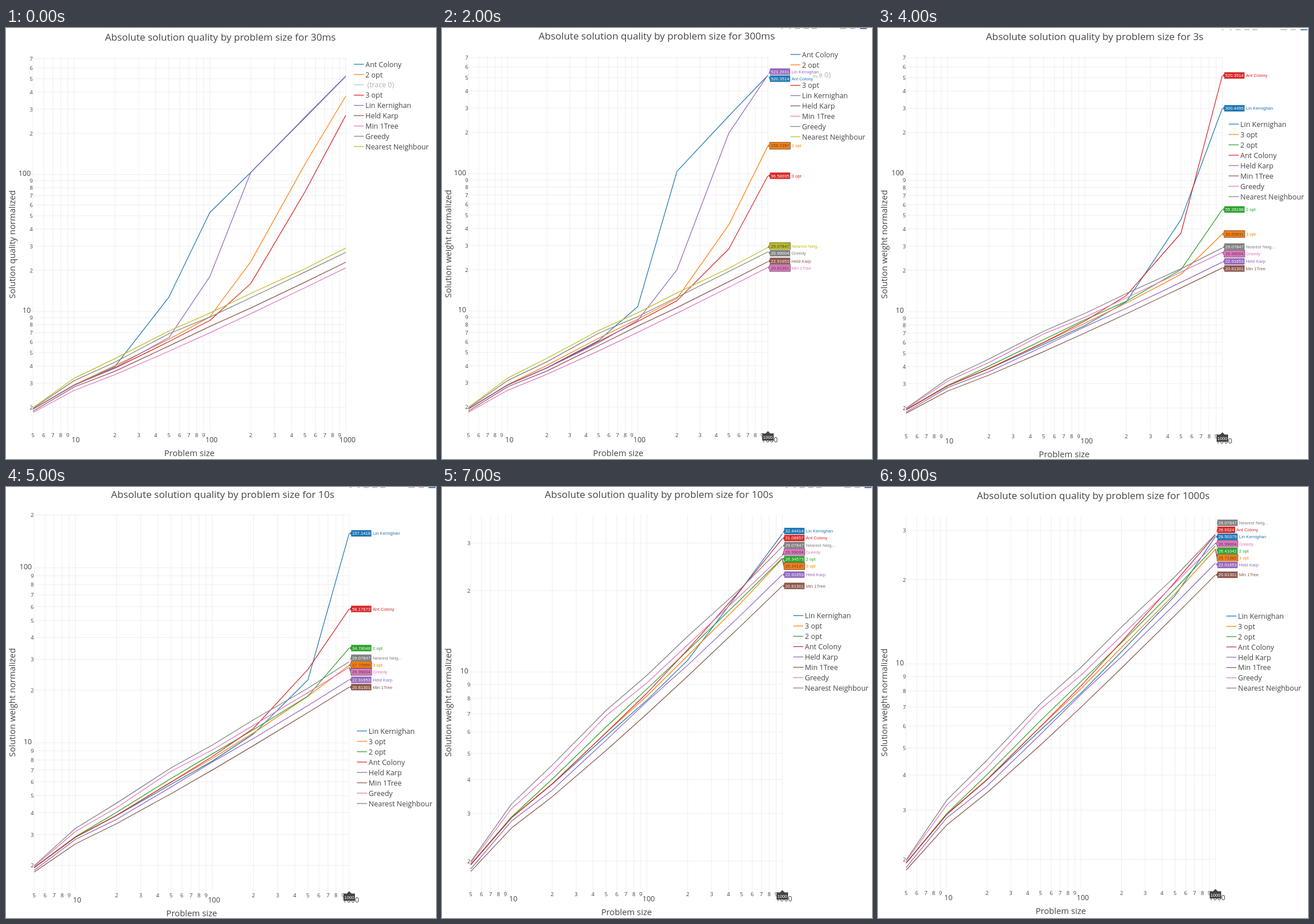
An HTML page for the animation above (10 s loop, 748x749 px).

```html
<!DOCTYPE html>
<html lang="en">
<head>
<meta charset="utf-8">
<title>Solution quality by problem size</title>
<style>
  html, body { margin: 0; width: 100%; height: 100%; overflow: hidden; background: #fff; }
  svg { display: block; width: 100%; height: 100%; }
  text { font-family: "Open Sans", sans-serif; fill: #444; white-space: pre; }
  .tip { font-family: "Liberation Sans", Arial, sans-serif; font-size: 7.65px; }
  .grid { stroke: #eee; stroke-width: 1; fill: none; }
  .curve { stroke-width: 1.25; fill: none; stroke-linejoin: round; }
</style>
</head>
<body>
<svg id="stage" viewBox="0 0 748 749"></svg>
<script>
const NS = "http://www.w3.org/2000/svg";
const SCENE_MS = 1000;
const SIZES = [5, 10, 20, 50, 100, 200, 500, 1000];
const COLORS = ["#1f77b4", "#ff7f0e", "#2ca02c", "#d62728", "#9467bd",
                "#8c564b", "#e377c2", "#7f7f7f", "#bcbd22"];
const DARK_TEXT = ["#ff7f0e", "#e377c2", "#bcbd22"];

const ANT = "Ant Colony", LK = "Lin Kernighan", OPT2 = "2 opt", OPT3 = "3 opt", HIDDEN = " (trace 0)";
const BOUNDS = ["Held Karp", "Min 1Tree", "Greedy", "Nearest Neighbour"];
const ORDER_A = [ANT, OPT2, HIDDEN, OPT3, LK, ...BOUNDS];
const ORDER_B = [LK, OPT3, OPT2, ANT, ...BOUNDS];

// Converged curves; each run replaces only the last few values.
const BASE = {
  [ANT]:  [1.94, 2.89, 3.86, 5.97, 8.35, 12, 19.6, 28.9324],
  [LK]:   [1.94, 2.89, 3.85, 5.8, 7.87, 11.05, 17.5, 28.50379],
  [OPT2]: [1.94, 2.91, 4.02, 6.27, 8.65, 11.9, 18.5, 26.41042],
  [OPT3]: [1.94, 2.9, 3.86, 5.97, 8.15, 11.45, 17.8, 25.71382],
  "Held Karp": [1.87, 2.81, 3.66, 5.6, 7.78, 10.6, 16.35, 22.91653],
  "Min 1Tree": [1.83, 2.65, 3.46, 5.13, 7, 9.65, 14.9, 20.81301],
  "Greedy": [1.97, 3.12, 4.27, 6.89, 9.11, 12.6, 19.4, 26.99004],
  "Nearest Neighbour": [1.99, 3.25, 4.53, 7.21, 9.72, 13.55, 20.5, 29.07847]
};

function run(ant, lk, opt2, opt3) {
  const tails = { [ANT]: ant, [LK]: lk, [OPT2]: opt2, [OPT3]: opt3 };
  const out = {};
  for (const name in BASE) {
    const tail = tails[name] || [];
    out[name] = BASE[name].slice(0, 8 - tail.length).concat(tail);
  }
  return out;
}

function between(a, b) {
  const out = {};
  for (const name in a) out[name] = a[name].map((v, i) => Math.sqrt(v * b[name][i]));
  return out;
}

const ms30 = run([3.96, 12.75, 52.9, 103.5, 259, 520.3514], [3.9, 6.45, 18, 103.5, 262, 523.2631],
                 [6.27, 9.14, 23.1, 118.5, 374], [6.03, 8.6, 16, 74.5, 270]);
const ms300 = run([6.1, 10.8, 104, 263, 520.3514], [5.88, 8.56, 20, 197, 523.2631],
                  [6.35, 8.73, 12.35, 42.4, 159.7297], [6, 8.4, 11.9, 28.3, 96.58695]);
const s3 = run([8.57, 13.1, 37.2, 520.3514], [7.94, 11.8, 46.7, 300.4495],
               [8.74, 11.9, 20.2, 55.28198], [8.25, 11.55, 18.7, 36.65631]);
const s10 = run([12.1, 26.3, 58.17873], [11.25, 22.9, 157.1418], [11.9, 18.5, 34.78048], [11.4, 18.5, 27.70958]);
const s30 = run([12, 21.1, 46.63331], [11.1, 21.1, 64.96653], [11.9, 18.5, 27.48489], [11.5, 18.3, 26.37077]);
const s100 = run([12.1, 20.3, 31.08857], [11.05, 20.3, 32.44414], [12, 18.7, 26.34573], [11.5, 18.1, 26.24137]);
const s1000 = run([], [], [], []);

// x: plot left/right, y: plot top/bottom, ten: y of value 10, dec: height of a decade,
// head: title centre, key: legend corner, bar: toolbar corner, k: text scale
const SCENES = [
  { label: "30ms", data: ms30, order: ORDER_A, x: [47, 591], y: [51, 701], ten: 492.7, dec: 238.1,
    head: [373, 16], key: [605, 63], ticks: 707, k: 1, plain: true },
  { label: "100ms", data: between(ms30, ms300), order: ORDER_A, x: [50, 600], y: [50, 702], ten: 493, dec: 239,
    head: [378, 15], key: [613, 58], ticks: 708, k: 1.008 },
  { label: "300ms", data: ms300, order: ORDER_A, x: [46, 567], y: [49, 701], ten: 491.9, dec: 238.7,
    head: [373.5, 14], key: [606, 46], ticks: 707, k: 1, bar: [590, 0] },
  { label: "1s", data: between(ms300, s3), order: ORDER_B, x: [48, 598], y: [50, 702], ten: 493, dec: 239,
    head: [376, 15], key: [610, 167], ticks: 708, k: 1.008 },
  { label: "3s", data: s3, order: ORDER_B, x: [49, 599], y: [50, 702], ten: 493, dec: 239.2,
    head: [377, 14.5], key: [610, 167], ticks: 709, k: 1.007, bar: [598, 2] },
  { label: "10s", data: s10, order: ORDER_B, x: [49, 597], y: [47, 702], ten: 444.7, dec: 304.4,
    head: [377, 13], key: [610.5, 424], ticks: 709, k: 1.007, bar: [598, 0] },
  { label: "30s", data: s30, order: ORDER_B, x: [50, 600], y: [46, 701], ten: 387.7, dec: 381,
    head: [379, 11], key: [613.5, 283.3], ticks: 708, k: 1.01 },
  { label: "100s", data: s100, order: ORDER_B, x: [50, 592], y: [48, 701], ten: 321.5, dec: 470,
    head: [377.5, 13], key: [611, 223.5], ticks: 707, k: 1.005, bar: [598, 0] },
  { label: "300s", data: between(s100, s1000), order: ORDER_B, x: [50, 600], y: [49, 701], ten: 314, dec: 480,
    head: [379, 13], key: [613.5, 224], ticks: 708, k: 1.01 },
  { label: "1000s", data: s1000, order: ORDER_B, x: [49, 587], y: [51, 698], ten: 307.3, dec: 486,
    head: [374.5, 15], key: [606, 224.3], ticks: 705, k: 1 }
];

function add(parent, tag, attrs, text) {
  const el = document.createElementNS(NS, tag);
  for (const a in attrs) el.setAttribute(a, attrs[a]);
  if (text !== undefined) el.textContent = text;
  parent.appendChild(el);
  return el;
}

// Text whose capitals are centred on y.
function write(g, text, x, y, size, anchor = "middle", extra = {}) {
  return add(g, "text", { x, y: y + size * 0.357, "font-size": size, "text-anchor": anchor, ...extra }, text);
}

// Moves sorted positions apart to a minimum gap, keeping each cluster centred.
function spread(ys, gap) {
  const blocks = [];
  ys.forEach((y, i) => {
    let b = { sum: y - i * gap, n: 1 };
    while (blocks.length) {
      const p = blocks[blocks.length - 1];
      if (p.sum / p.n <= b.sum / b.n) break;
      blocks.pop();
      b = { sum: p.sum + b.sum, n: p.n + b.n };
    }
    blocks.push(b);
  });
  return blocks.flatMap(b => Array(b.n).fill(b.sum / b.n)).map((y, i) => y + i * gap);
}

function drawAxes(g, s, px, py) {
  const [x0, x1] = s.x, [top, bottom] = s.y;
  const small = 9.4 * s.k, big = 12.4 * s.k;
  let lines = "";
  for (let e = 0; e <= 3; e++) {
    for (let m = 1; m <= 9; m++) {
      const v = m * 10 ** e, x = px(v), y = py(v);
      if (v >= 5 && v <= 1000) {
        lines += `M${x} ${top}V${bottom}`;
        if (m === 1) write(g, v, x + 3, s.ticks + 8.7, big);
        else write(g, m, x, s.ticks + 0.3, small);
      }
      if (y >= top && y <= bottom) {
        lines += `M${x0} ${y}H${x1}`;
        if (m === 1) write(g, v, x0 - 4, y - 2, big, "end");
        else write(g, m, x0 - 0.5, y + 0.3, small, "end");
      }
    }
  }
  g.insertBefore(add(g, "path", { class: "grid", d: lines }), g.firstChild);

  write(g, "Absolute solution quality by problem size for " + s.label, s.head[0], s.head[1], 17.05 * s.k);
  write(g, "Problem size", (x0 + x1) / 2, s.ticks + 31.5, 14.7 * s.k);
  const cy = (top + bottom) / 2;
  write(g, `Solution ${s.plain ? "quality" : "weight"} normalized`, 10.5, cy, 14.75 * s.k, "middle",
        { transform: `rotate(-90 10.5 ${cy})` });
}

function drawLegend(g, s) {
  const [x, y] = s.key;
  s.order.forEach((name, i) => {
    const cy = y + i * 17.88 * s.k;
    const row = add(g, "g", { opacity: name === HIDDEN ? 0.42 : 1 });
    add(row, "path", { class: "curve", d: `M${x} ${cy}h17.5`, stroke: COLORS[i] });
    write(row, name, x + 20.3, cy + 0.3, 12.4 * s.k, "start");
  });
}

function drawTips(g, s, py) {
  const x = s.x[1], left = x + 3;
  const tips = s.order.map((name, i) => ({ name, color: COLORS[i] }))
    .filter(t => s.data[t.name])
    .map(t => ({ ...t, value: s.data[t.name][7] }))
    .sort((a, b) => b.value - a.value);
  const rows = spread(tips.map(t => py(t.value)), 12.2);
  tips.forEach((t, i) => {
    const cy = rows[i], label = String(+t.value.toPrecision(7));
    const w = 36 - 4.4 * (8 - label.length);
    const ink = DARK_TEXT.includes(t.color) ? "#444" : "#fff";
    const name = t.name.length > 15 ? t.name.slice(0, 12) + "..." : t.name;
    add(g, "rect", { x: left + w, y: cy - 6, width: name.length * 3.7 + 2, height: 12, fill: "#fff" });
    add(g, "path", {
      d: `M${x} ${py(t.value)}L${left} ${cy - 3}V${cy - 6}h${w}v12H${left}V${cy + 3}Z`,
      fill: t.color, stroke: ink, "stroke-width": 0.8
    });
    write(g, label, left + w / 2, cy, 7.65, "middle", { class: "tip", style: `fill:${ink}` });
    write(g, name, left + w + 2, cy, 7.65, "start", { class: "tip", style: `fill:${t.color}` });
  });
  const y = s.ticks - 2.5;
  add(g, "path", { d: `M${x} ${y - 4}l4 4h6v12.5h-20v-12.5h6Z`, fill: "#444" });
  write(g, "1000", x, y + 6.3, 7.65, "middle", { class: "tip", style: "fill:#fff" });
}

function drawBar(g, [x, y]) {
  for (const [dx, w] of [[0, 3], [14, 3], [24, 9], [39, 9], [53, 9], [102, 11], [120, 9]])
    add(g, "rect", { x: x + dx, y, width: w, height: 1.6, fill: "#b9bbc2" });
  add(g, "rect", { x: x + 137, y, width: 12, height: 2, fill: "#5b78b8" });
}

function build(s) {
  const g = add(stage, "g", { display: "none" });
  const [x0, x1] = s.x;
  const px = v => x0 + (x1 - x0) * Math.log10(v / 5) / Math.log10(200);
  const py = v => s.ten - s.dec * Math.log10(v / 10);
  drawAxes(g, s, px, py);
  s.order.forEach((name, i) => {
    if (!s.data[name]) return;
    const points = s.data[name].map((v, j) => px(SIZES[j]) + "," + py(v)).join(" ");
    add(g, "polyline", { class: "curve", points, stroke: COLORS[i] });
  });
  drawLegend(g, s);
  if (!s.plain) drawTips(g, s, py);
  if (s.bar) drawBar(g, s.bar);
  return g;
}

const stage = document.getElementById("stage");
const groups = SCENES.map(build);
const start = performance.now();
let current = -1;

function update(now) {
  const i = Math.floor(Math.max(0, now - start) / SCENE_MS) % groups.length;
  if (i !== current) {
    groups.forEach((g, j) => g.setAttribute("display", j === i ? "inline" : "none"));
    current = i;
  }
  requestAnimationFrame(update);
}
update(start);
</script>
</body>
</html>
```
